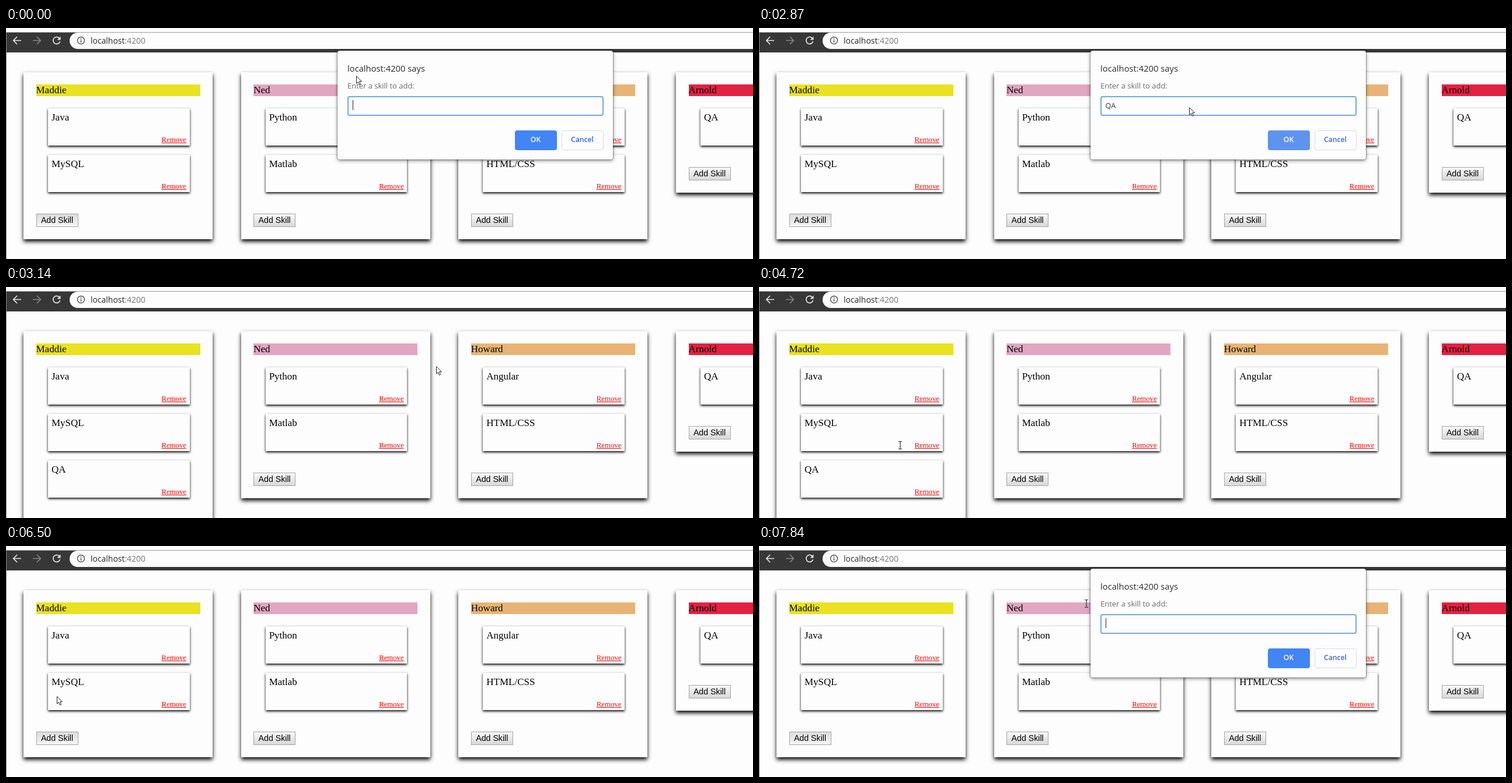
These frames come from a looping animation (1280x397 px, 8000 ms). An HTML page:

```html
<!DOCTYPE html>
<html lang="en">
<head>
<meta charset="utf-8">
<title>Skill board</title>
<style>
  html, body { margin: 0; width: 100%; height: 100%; overflow: hidden; background: #fdfdfd; }
  #stage { position: relative; width: 1280px; height: 397px; overflow: hidden; background: #fdfdfd; }
  #stage * { box-sizing: border-box; }
  .abs, .card, .add, .remove, #dialog * { position: absolute; white-space: nowrap; }
  .anim { animation: 8s step-end infinite; }

  /* browser frame */
  #bar { left: 0; top: 7px; width: 1280px; height: 35px; background: #373737; border-top: 1px solid #9c9c9c; }
  #url { left: 109px; top: 0; width: 1200px; height: 28px; border-radius: 14px; background: #fdfdfd;
    padding-left: 36px; font: 13.95px/27px "Open Sans", sans-serif; color: #2a2a2a; }
  #url span { color: #777; }
  #edge { left: 0; top: 8px; width: 1px; height: 389px; background: #8c8c8c; }

  /* board */
  .card { left: calc(30px + 372.67px * var(--i)); top: 76px; width: 324px; height: 287px; padding-top: 21px;
    background: #fdfdfd; box-shadow: 0 4px 7px #000; font: 17px/20px "Liberation Serif", "Times New Roman", serif; color: #000; }
  .name { margin: 0 0 21px 21.5px; width: 281px; height: 20px; background: var(--c); }
  .skill { position: relative; margin: 0 0 16.5px 42px; width: 242.5px; height: 63.5px; padding: 6px;
    background: #fdfdfd; box-shadow: 0 2px 4px #000; }
  .remove { right: 5.5px; top: 44px; font-size: 12.75px; color: #f00; }
  .add { left: 21.5px; bottom: 21px; width: 72px; height: 23.5px; border: 1px solid #a5a5a5;
    background: linear-gradient(#f8f8f8, #d9d9d9); font: 14.2px/21px "Liberation Sans", Arial, sans-serif; text-align: center; }
  #first { animation-name: grow; }
  #extra { visibility: hidden; animation-name: extra; }
  #first .add { background: linear-gradient(#dcdcdc, #f6f6f6); animation-name: press; }

  /* prompt */
  #dialog { position: absolute; left: 568px; top: 39px; width: 472px; height: 187px; border-radius: 4px; background: #fdfdfd;
    box-shadow: 0 0 1px 1px rgba(0,0,0,.3), 0 2px 6px rgba(0,0,0,.45);
    font: 12.98px/20px "Open Sans", "Noto Sans", sans-serif; animation-name: dialog; }
  #title { left: 17px; top: 19.5px; font-size: 14.75px; color: #2b2b2b; }
  #label { left: 17px; top: 50px; color: #6a6a6a; }
  #field { left: 17px; top: 78px; width: 438.5px; height: 34px; border: 2px solid #77a5e6; border-radius: 4px; }
  .key { top: 84.5px; font-size: 12.5px; color: #333; visibility: hidden; }
  #q { left: 25.5px; animation-name: q; }
  #a { left: 35.3px; animation-name: a; }
  #caret { left: 26px; top: 85px; width: 1px; height: 17px; background: #222; animation-name: caret; }
  .btn { top: 137px; width: 72px; height: 33.5px; border-radius: 4px; text-align: center; font-size: 12.2px; font-weight: 600; line-height: 32px; }
  #ok { left: 303.5px; background: #4285f4; color: #fff; animation-name: ok; }
  #cancel { left: 383.5px; border: 1px solid #dadce0; color: #3367d6; line-height: 30px; }

  #cursor { left: 0; top: 0; width: 1px; height: 1px; overflow: visible; transform: translate(600px, 82px); animation-name: move; }
  #arrow { animation-name: arrow; }
  #beam { opacity: 0; animation-name: beam; }

  @keyframes grow { 37.5% { height: 367px; } 67.125% { height: 287px; } }
  @keyframes extra { 37.5% { visibility: visible; } 67.125% { visibility: hidden; } }
  @keyframes press {
    37.5% { background: linear-gradient(#f8f8f8, #d9d9d9); }
    77.375% { background: linear-gradient(#fcfcfc, #e4e4e4); }
    81.25% { background: linear-gradient(#dcdcdc, #f6f6f6); }
  }
  @keyframes dialog {
    0% { opacity: 1; transform: none; }
    37.5% { opacity: .5; transform: translateY(-10.5px); }
    39.25% { opacity: 0; }
    86% { opacity: 1; transform: translateY(-2.5px); }
    87.875% { transform: none; }
  }
  @keyframes q { 12% { visibility: visible; } 39.25% { visibility: hidden; } }
  @keyframes a { 17.75% { visibility: visible; } 39.25% { visibility: hidden; } }
  @keyframes caret {
    0% { opacity: 1; transform: none; }
    6.625% { opacity: 0; }
    12% { opacity: 1; transform: translateX(10px); }
    17.75% { transform: translateX(17px); }
    22.875% { opacity: 0; }
    29.5% { opacity: 1; }
    35.875% { opacity: 0; }
    86% { opacity: 1; transform: none; }
    91.25% { opacity: 0; }
    98% { opacity: 1; }
  }
  @keyframes ok { 29.5% { background: #5e94ee; } 39.25% { background: #4285f4; } }
  @keyframes move {
    24.625% { transform: translate(658px, 126px); }
    26.25% { transform: translate(711px, 167px); }
    28% { transform: translate(737px, 136px); }
    46.25% { transform: translate(359px, 288px); }
    48.25% { transform: translate(237px, 305px); }
    55.25% { transform: translate(223px, 297px); }
    57.125% { transform: translate(229px, 288px); }
    59% { transform: translate(242px, 272px); }
    67.125% { transform: translate(240px, 272px); }
    72.25% { transform: translate(215px, 272px); }
    74% { transform: translate(150px, 264px); }
    75.5% { transform: translate(102px, 258px); }
    77.375% { transform: translate(87px, 258px); }
    87.875% { transform: translate(310px, 185px); }
    89.375% { transform: translate(525px, 108px); }
    91.25% { transform: translate(572px, 66px); }
    93.125% { transform: translate(567px, 76px); }
    94.625% { transform: translate(562px, 85px); }
    96.375% { transform: translate(565px, 94px); }
    98% { transform: translate(561px, 99px); }
  }
  @keyframes arrow { 59% { opacity: 0; } 67.125% { opacity: 1; } 96.375%, 100% { opacity: 0; } }
  @keyframes beam { 59% { opacity: 1; } 67.125% { opacity: 0; } 96.375%, 100% { opacity: 1; } }
</style>
</head>
<body>
<div id="stage">
  <div id="bar" class="abs">
    <div id="url" class="abs">localhost<span>:4200</span></div>
  </div>
  <svg class="abs" style="left:0;top:0" width="150" height="42" fill="none" stroke-width="1.7">
    <path id="back" d="M26 21.5H13M19 15L12.7 21.5L19 28" stroke="#e4e4e4"/>
    <path d="M46 21.5H59M53 15L59.3 21.5L53 28" stroke="#858585"/>
    <path d="M91.5 17.6A6 6 0 1 0 92.6 23" stroke="#e4e4e4"/>
    <path d="M93.5 14.5V20.5H87.5z" fill="#e4e4e4"/>
    <circle cx="128.5" cy="21.5" r="6" stroke="#555" stroke-width="1.5"/>
    <path d="M128.5 20.5V25M128.5 17.8V19.4" stroke="#555" stroke-width="1.5"/>
  </svg>
  <div id="edge" class="abs"></div>

  <div class="card anim" id="first" style="--i:0;--c:#e9e221">
    <div class="name">Maddie</div>
    <div class="skill">Java<u class="remove">Remove</u></div>
    <div class="skill">MySQL<u class="remove">Remove</u></div>
    <div class="skill anim" id="extra">QA<u class="remove">Remove</u></div>
    <div class="add anim">Add Skill</div>
  </div>
  <div class="card" style="--i:1;--c:#e1a6c0">
    <div class="name">Ned</div>
    <div class="skill">Python<u class="remove">Remove</u></div>
    <div class="skill">Matlab<u class="remove">Remove</u></div>
    <div class="add">Add Skill</div>
  </div>
  <div class="card" style="--i:2;--c:#e8b475">
    <div class="name">Howard</div>
    <div class="skill">Angular<u class="remove">Remove</u></div>
    <div class="skill">HTML/CSS<u class="remove">Remove</u></div>
    <div class="add">Add Skill</div>
  </div>
  <div class="card" style="--i:3;--c:#e32143;height:207px">
    <div class="name">Arnold</div>
    <div class="skill">QA<u class="remove">Remove</u></div>
    <div class="add">Add Skill</div>
  </div>

  <div id="dialog" class="anim">
    <div id="title">localhost:4200 says</div>
    <div id="label">Enter a skill to add:</div>
    <div id="field"></div>
    <span id="q" class="key anim">Q</span><span id="a" class="key anim">A</span>
    <div id="caret" class="anim"></div>
    <div id="ok" class="btn anim">OK</div>
    <div id="cancel" class="btn">Cancel</div>
  </div>

  <svg id="cursor" class="abs anim">
    <path id="arrow" class="anim" d="M.5 .7V13.2L3.4 10.5L5.5 15.4L7.6 14.5L5.5 9.8H9.4z" fill="#fff" stroke="#222"/>
    <path id="beam" class="anim" d="M-3 -6.5H-1L0 -5.5L1 -6.5H3M0 -5.5V5.5M-3 6.5H-1L0 5.5L1 6.5H3" fill="none" stroke="#333" stroke-width="1.2"/>
  </svg>
</div>
</body>
</html>
```
